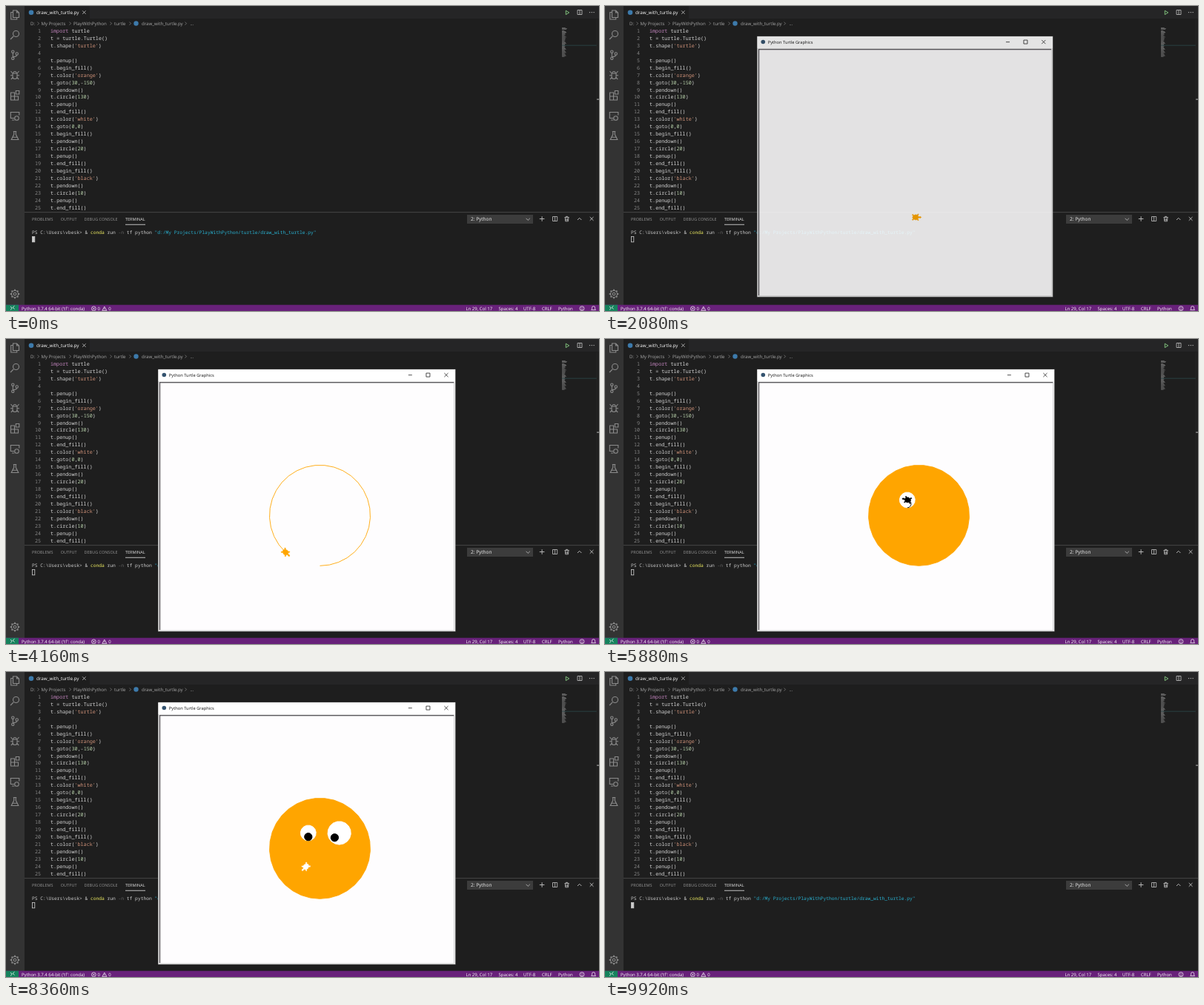
Recreate the animation shown at these times as an HTML page. Size 800 by 412 pixels, loop 10 s.

```html
<!DOCTYPE html>
<html lang="en">
<head>
<meta charset="utf-8">
<title>Drawing with turtle</title>
<style>
  html, body { margin: 0; width: 100%; height: 100%; overflow: hidden; background: #1e1e1e; }
  svg { display: block; width: 800px; height: 412px; }
  text { white-space: pre; text-rendering: geometricPrecision; font-family: "Open Sans", "Noto Sans", sans-serif; }
  .mono { font-family: "Noto Sans Mono", "DejaVu Sans Mono", monospace; }
</style>
</head>
<body>
<svg id="stage" viewBox="0 0 800 412" xmlns="http://www.w3.org/2000/svg"></svg>
<script>
const NS = 'http://www.w3.org/2000/svg';
const stage = document.getElementById('stage');

function el(tag, attrs, parent = stage) {
  const node = document.createElementNS(NS, tag);
  for (const key in attrs) node.setAttribute(key, attrs[key]);
  parent.appendChild(node);
  return node;
}
const rect = (x, y, width, height, fill, parent) => el('rect', { x, y, width, height, fill }, parent);
const dot = (cx, cy, r, fill, parent) => el('circle', { cx, cy, r, fill }, parent);
const line = (d, stroke, width = 1, parent) =>
  el('path', { d, stroke, 'stroke-width': width, fill: 'none' }, parent);

function label(x, y, text, size, fill, parent) {
  const node = el('text', { x, y, 'font-size': size, fill }, parent);
  node.textContent = text;
  return node;
}

// Monospaced text made of [text, colour] runs
function mono(x, y, size, runs, anchor = 'start') {
  const node = el('text', { x, y, 'font-size': size, 'text-anchor': anchor, class: 'mono' });
  for (const [text, fill] of runs) el('tspan', { fill }, node).textContent = text;
}

const CODE = `import turtle
t = turtle.Turtle()
t.shape('turtle')

t.penup()
t.begin_fill()
t.color('orange')
t.goto(30,-150)
t.pendown()
t.circle(130)
t.penup()
t.end_fill()
t.color('white')
t.goto(0,0)
t.begin_fill()
t.pendown()
t.circle(20)
t.penup()
t.end_fill()
t.begin_fill()
t.color('black')
t.pendown()
t.circle(10)
t.penup()
t.end_fill()`.split('\n');

function tokenColor(token) {
  if (token[0] === "'") return '#ce9178';
  if (token === 'import') return '#c586c0';
  return /^\d/.test(token) ? '#b5cea8' : '#d4d4d4';
}

function drawEditor() {
  rect(0, 0, 800, 412, '#1e1e1e');
  rect(25, 0, 775, 17, '#252526');
  rect(25, 0, 88, 17, '#1e1e1e');
  dot(34, 8.8, 3.3, '#3d7aab');
  label(41, 11.2, 'draw_with_turtle.py', 6.3, '#ffffff');
  line('M103.2 6.4l4.4 4.4m0-4.4l-4.4 4.4', '#d0d0d0', 0.8);
  line('M755.3 6.2v5.4l4.4-2.7z', '#89d185', 0.9);
  line('M771 5.5h6v6h-6zM774 5.5v6', '#c5c5c5', 0.8);
  for (const x of [787.5, 790.3, 793.1]) dot(x, 8.6, 0.7, '#c5c5c5');

  const crumbs = [[33, 'D:'], [47.5, 'My Projects'], [91, 'PlayWithPython'],
    [146, 'turtle'], [183, 'draw_with_turtle.py'], [248.5, '...']];
  for (const [x, text] of crumbs) label(x, 25.7, text, 6.1, '#a9a9a9');
  for (const x of [42.5, 85.5, 140.5, 166.5, 241.5]) line(`M${x} 21.6l2 2-2 2`, '#8a8a8a', 0.7);
  dot(175.5, 23.5, 3.2, '#3d7aab');

  CODE.forEach((text, i) => {
    const y = 36 + i * 9.94;
    mono(47, y, 6.75, [[i + 1, '#858585']], 'end');
    const tokens = text.match(/'[^']*'|\w+|\W/g) || [];
    mono(60, y, 6.75, tokens.map(token => [token, tokenColor(token)]));
    rect(750, 29 + i * 1.05, text.length * 0.36, 0.7, '#777777');
  });
  for (let i = 0; i < 13; i++) rect(750, 55.2 + i * 1.05, 3.5 + (i * 5 % 4) * 0.7, 0.7, '#777777');
  line('M750 53.2h47', '#2c4a4c', 0.8);
  line('M797 18v260', '#2b2b2b', 0.6);
  rect(797, 125.5, 3, 1.2, '#a0a0a0');
}

function drawActivityBar() {
  rect(0, 0, 25, 404, '#333333');
  const ink = '#8b8b8b';
  const icons = [
    'M9.5 6h5l3 3v6.500h-8zM9.500 8.500h-2.800v9.500h8v-2.500M14.500 6v3h3',
    'M10 41l-4 4',
    'M9.300 63.300v5.500M14.700 66.300c0 3-5.400 1.300-5.400 3.500',
    'M9 91h6v4.500a3 3 0 0 1-6 0zM10 90.500a2 2 0 0 1 4 0M6.500 88l2.500 3m6 0l2.500-3M6 93.800h3m6 0h3M6.800 99l2.700-2.800m5 0l2.700 2.800',
    'M6.500 117h5v10h-5zM6.500 122h10v5h-10M13.300 114.500h4.500v4.500h-4.500z',
    'M11 151.500H6.300v-8h11.500v4M8 154h3.500',
    'M9.800 169.500h4.400m-3.500 0v4l-3.500 7h9.600l-3.500-7v-4M8.900 177.200h6.200'
  ];
  for (const d of icons) line(d, ink, 1.1);
  for (const [x, y, r] of [[13.5, 37.5, 4], [9.3, 61.7, 1.7], [14.7, 64.5, 1.7], [9.3, 70.7, 1.7],
    [14.5, 151.5, 2.8], [12, 389, 1.8], [12, 389, 4.5]]) {
    const ring = dot(x, y, r, 'none');
    ring.setAttribute('stroke', ink);
    ring.setAttribute('stroke-width', 1.1);
  }
  for (let a = 0; a < 360; a += 45) {
    el('path', { d: 'M12 384.600v-1.900', stroke: ink, 'stroke-width': 1.8, transform: `rotate(${a} 12 389)` });
  }
}

function drawPanel() {
  rect(25, 278.2, 775, 0.9, '#4a4a4a');
  const tabs = [[35, 'PROBLEMS'], [73.8, 'OUTPUT'], [105.5, 'DEBUG CONSOLE'], [161, 'TERMINAL']];
  for (const [x, text] of tabs) label(x, 290, text, 5.5, text === 'TERMINAL' ? '#e7e7e7' : '#969696');
  rect(161, 294.8, 27, 0.8, '#e7e7e7');
  rect(622, 282, 89, 12, '#3c3c3c');
  label(627, 290.4, '2: Python', 6.5, '#f0f0f0');
  const ink = '#c5c5c5';
  line('M701.600 286.800l2.600 2.600 2.600-2.600', ink, 0.8);
  line('M719.800 287.500h6.600m-3.300-3.300v6.600', ink, 0.9);
  line('M737.500 284.500h6.200v6h-6.200zM740.600 284.500v6', ink, 0.8);
  line('M753.500 285.500h6.200M755.500 285.500v-1.200h2.200v1.200M754.300 285.800l.4 5h3.800l.4-5M755.900 287v3m1.500-3v3', ink, 0.8);
  line('M771 289l2.700-2.700 2.700 2.700', ink, 0.9);
  line('M787.700 285l4.800 4.800m0-4.800l-4.800 4.800', ink, 0.9);
  mono(35, 308.2, 6.28, [
    ['PS C:\\Users\\vbesk> & ', '#cccccc'], ['conda ', '#f0ee62'], ['run ', '#cccccc'], ['-n ', '#666666'],
    ['tf python ', '#cccccc'], ['"d:/My Projects/PlayWithPython/turtle/draw_with_turtle.py"', '#29b0cf']
  ]);
}

function drawStatusBar() {
  rect(0, 403.7, 800, 8.3, '#68217a');
  rect(0, 403.7, 17, 8.3, '#16825d');
  line('M6 406l2.300 2.200-2.300 2.200M11.500 405l-2.300 2.200 2.300 2.200', '#ffffff', 0.8);
  const items = [[21, "Python 3.7.4 64-bit ('tf': conda)"], [123.5, '0'], [138.3, '0'], [620.5, 'Ln 29, Col 17'],
    [664.5, 'Spaces: 4'], [698, 'UTF-8'], [723, 'CRLF'], [745, 'Python']];
  for (const [x, text] of items) label(x, 411, text, 6, '#ffffff');
  line('M121.300 408.800a2.900 2.900 0 1 1-5.800 0a2.900 2.900 0 1 1 5.800 0M117.200 407.600l2.400 2.400m0-2.400l-2.400 2.400', '#ffffff', 0.7);
  line('M132.800 406l3 5.300h-6zM132.800 408v1.600', '#ffffff', 0.7);
  line('M780 408.600a3 3 0 1 1-6 0a3 3 0 1 1 6 0M775.600 409.300q1.400 1.600 2.800 0M775.900 407.500h.7m.9 0h.7', '#ffffff', 0.7);
  line('M789.700 410.500h5.800l-.9-1.400v-1.600a2 2 0 0 0-4 0v1.600z', '#ffffff', 0.7);
}

function drawWindow() {
  const g = el('g', {});
  rect(205, 40.8, 401.600, 354.400, '#8a8a8a', g);
  rect(205.6, 41.3, 400.400, 353.300, '#f0f0f0', g);
  rect(205.6, 41.3, 400.400, 15.700, '#ffffff', g);
  rect(206.8, 58, 398.200, 335.800, '#e3e3e3', g);
  rect(206.8, 58, 397.400, 335, '#5c5a5e', g);
  rect(208.2, 59.4, 396, 333.600, '#fefdfe', g);
  dot(213.3, 48.5, 2.8, '#34536f', g);
  label(219.8, 51, 'Python Turtle Graphics', 5.75, '#111111', g);
  line('M542.800 48.700h5', '#222222', 0.8, g);
  line('M566.900 46.100h5v5h-5z', '#222222', 0.8, g);
  line('M591.300 46l5.200 5.200m0-5.200l-5.200 5.200', '#222222', 0.8, g);
  return g;
}

// One pen move and one circle each: times in ms, places in turtle units
const STEPS = [
  { color: 'orange', go: [1900, 2140], to: [30, -150], head: 0, r: 130, n: 33, draw: [2140, 4420] },
  { color: 'white', go: [4440, 4740], to: [0, 0], head: 0, r: 20, n: 15, draw: [4760, 5540] },
  { color: 'black', go: [5540, 5540], to: [0, 0], head: 0, r: 10, n: 13, draw: [5540, 6216] },
  { color: 'white', go: [6216, 6380], to: [80, -10], head: 0, r: 30, n: 17, draw: [6380, 7264] },
  { color: 'black', go: [7264, 7380], to: [68, -2], head: 0, r: 10, n: 13, draw: [7380, 8110] },
  { color: 'white', go: [8120, 8320], to: [-5, -66], head: 225, r: 40, n: 18, draw: [8380, 9640] }
];
const LOOP = 10000, TICK = 40, OPEN = 1880, CLOSE = 9720, SHUT = 9920;
const INK = { orange: '#ffa500', white: '#ffffff', black: '#000000' };

const progress = (t, [from, to]) => to > from ? Math.min(1, Math.max(0, (t - from) / (to - from))) : +(t >= from);

function circlePoint({ to: [x, y], head, r, n }, k) {
  const a = head * Math.PI / 180, b = a + k * 2 * Math.PI / n;
  return [x + r * (Math.sin(b) - Math.sin(a)), y + r * (Math.cos(a) - Math.cos(b))];
}
const arc = (step, k) => Array.from({ length: k + 1 }, (_, i) => circlePoint(step, i)).join(' ');

drawEditor();
drawPanel();
drawActivityBar();
drawStatusBar();
const caret = el('rect', { x: 35.4, y: 311.4, width: 3.4, height: 7.4, stroke: '#cccccc', 'stroke-width': 0.8 });
const win = drawWindow();
const paper = el('g', { transform: 'translate(407.8 227.9) scale(.523 -.523)' }, win);
for (const step of STEPS) {
  step.node = el('polyline', { stroke: INK[step.color], 'stroke-width': 1.7 }, paper);
}

const side = [[0, 16], [2, 14], [1, 10], [4, 7], [7, 9], [9, 8], [6, 5], [7, 1], [5, -3], [8, -6], [6, -8], [4, -5], [0, -7]];
const turtleShape = [...side, ...side.slice(1, -1).reverse().map(([x, y]) => [-x, y])].join(' ');
const arrowShape = '0,0 -5,-9 0,-7 5,-9';
const pen = el('polygon', { 'stroke-width': 1 }, paper);

function show(t) {
  const open = t >= OPEN && t < SHUT;
  const focused = t <= OPEN || t >= CLOSE;
  caret.setAttribute('fill', focused ? '#cccccc' : 'none');
  win.style.display = open ? '' : 'none';
  if (!open) return;

  const closing = progress(t, [CLOSE, SHUT]);
  const opening = progress(t, [OPEN, 2112]);
  const scale = 0.96 + 0.04 * Math.min(opening, 1 - closing);
  win.setAttribute('opacity', (0.14 + 0.86 * opening) * (1 - closing));
  win.setAttribute('transform', `translate(205 41) scale(${scale}) translate(-205 -41)`);

  let place = [0, 0], heading = 0, color = 'black';
  for (const step of STEPS) {
    const k = Math.floor(progress(t, step.draw) * step.n);
    const done = k === step.n;
    step.node.setAttribute('points', k ? arc(step, k) : '');
    step.node.setAttribute('fill', done ? INK[step.color] : 'none');
    if (t < step.go[0]) continue;
    const p = progress(t, step.go);
    color = step.color;
    if (p < 1) {
      place = place.map((v, i) => v + (step.to[i] - v) * p);
    } else {
      place = circlePoint(step, k);
      heading = step.head + 360 * k / step.n;
    }
  }
  pen.setAttribute('points', t < 1900 ? arrowShape : turtleShape);
  pen.setAttribute('fill', INK[color]);
  pen.setAttribute('stroke', INK[color]);
  pen.setAttribute('transform', `translate(${place}) rotate(${heading - 90})`);
}

const start = performance.now();
function frame() {
  const t = (performance.now() - start) % LOOP;
  show(Math.floor(t / TICK) * TICK);
  requestAnimationFrame(frame);
}
frame();
</script>
</body>
</html>
```
